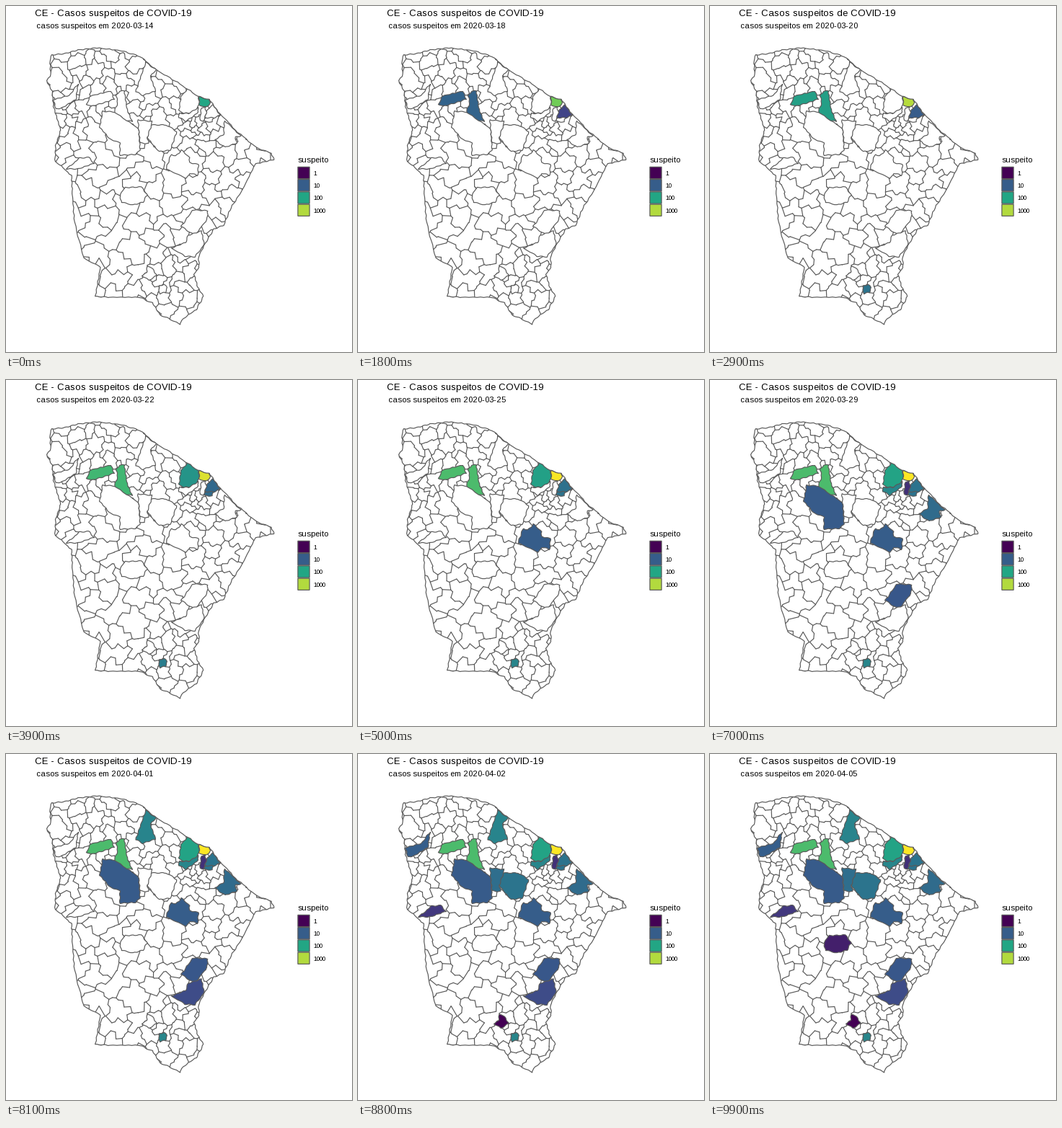
Recreate the animation shown at these times as a matplotlib script. Size 480 by 480 pixels, loop 10000 ms.

```python
import numpy as np
import matplotlib.pyplot as plt
from matplotlib.animation import FuncAnimation
from matplotlib.collections import LineCollection, PolyCollection
from matplotlib.colors import LinearSegmentedColormap
from matplotlib.patches import Polygon, Rectangle

SIZE, FRAMES, INTERVAL = 480, 100, 100
GREY, LINE = "#595959", 0.85
plt.rcParams.update({"font.family": "Liberation Sans",
                     "text.hinting_factor": 1})
scale = LinearSegmentedColormap.from_list(
    "cases", ["#440154", "#414487", "#2A788E", "#22A884", "#7AD151",
              "#FDE725"], N=1024)
rng = np.random.default_rng(14)


def outline(*xy):
    """Join key points by slightly uneven lines."""
    points = np.array(xy, float).reshape(-1, 2)
    parts = [a + (b - a) * np.linspace(0, 1, 9)[:-1, None]
             for a, b in zip(points, np.roll(points, -1, axis=0))]
    x, y = np.vstack(parts).T
    return np.column_stack([x + 0.6 * np.sin(0.7 * y + 0.2 * x),
                            y + 0.6 * np.sin(0.6 * x - 0.3 * y)])


def spacing(x, y):
    """Distance between towns: wide inland, tight around a few hubs."""
    hubs = ((262, 170, 18, 32), (95, 150, 13, 32), (225, 385, 13, 55),
            (130, 90, 10, 60), (205, 135, 9, 35), (305, 250, 6, 55))
    return 29 - sum(depth * np.exp(-((x - hx)**2 + (y - hy)**2) / reach**2)
                    for hx, hy, depth, reach in hubs)


def scatter(closeness, tries=9000):
    points = np.array([[210.0, 250.0]])
    for p in rng.uniform((45, 45), (385, 455), (tries, 2)):
        if np.hypot(*(points - p).T).min() > closeness * spacing(*p):
            points = np.vstack([points, p])
    return points


def shared_edge(a, b, near):
    """The part of the bisector of a and b that no nearer point claims."""
    middle, (dx, dy) = (a + b) / 2, b - a
    along, away = np.array([-dy, dx]), near - a
    slope = 2 * away @ along
    gap = (near**2).sum(1) - a @ a - 2 * away @ middle
    up, down = slope > 1e-9, slope < -1e-9
    high = np.min(gap[up] / slope[up], initial=9)
    low = np.max(gap[down] / slope[down], initial=-9)
    return [middle + low * along, middle + high * along] if low < high else None


def town_borders():
    """Patches of land go to the nearest town; draw lines between owners."""
    towns, patches = scatter(0.78), scatter(0.3)
    angle = rng.uniform(0, np.pi, len(towns))
    stretch = rng.uniform(0.72, 1.4, len(towns))
    dx, dy = np.moveaxis(patches[:, None] - towns, 2, 0)
    u = (dx * np.cos(angle) + dy * np.sin(angle)) * stretch
    v = (dy * np.cos(angle) - dx * np.sin(angle)) / stretch
    owner = np.argmin(np.hypot(u, v) / spacing(*towns.T), axis=1)
    lines = []
    for i, a in enumerate(patches):
        order = np.argsort(np.hypot(*(patches - a).T))[1:30]
        for j in order[:15]:
            if i < j and owner[i] != owner[j]:
                edge = shared_edge(a, patches[j], patches[order])
                if edge:
                    lines.append(edge)
    return lines


state_shape = outline(
    56, 103, 62, 97, 61, 74, 64, 68, 82, 66, 100, 61, 126, 58, 160, 62,
    186, 70, 209, 89, 238, 106, 266, 125, 282, 130, 294, 146, 318, 172,
    348, 197, 368, 204, 372, 213, 346, 219, 328, 255, 312, 280, 302, 304,
    288, 310, 275, 332, 267, 348, 268, 362, 261, 372, 266, 391, 274, 403,
    264, 421, 243, 436, 242, 442, 231, 436, 213, 428, 203, 412, 185, 404,
    144, 404, 124, 403, 131, 362, 108, 350, 95, 300, 92, 260, 91, 235,
    68, 215, 69, 193, 76, 172, 66, 140, 64, 118)

# First day, first and last colour position, days to settle, outline.
regions = [
    (3, .22, .695, 7, outline(112, 136, 117, 125, 146, 118, 150, 129, 136, 134,
                              118, 139)),
    (3, .22, .695, 7, outline(153, 125, 157, 118, 164, 118, 168, 143, 175, 160,
                              166, 159, 150, 148, 155, 134)),
    (0, .59, 1, 12, outline(268, 126, 281, 129, 284, 134, 277, 141, 268, 137)),
    (2, .13, .38, 10, outline(287, 137, 297, 151, 285, 157, 276, 155,
                              278, 146)),
    (9, .35, .38, 1, outline(276, 155, 288, 155, 286, 161, 274, 160)),
    (12, .14, .14, 1, outline(271, 141, 276, 140, 278, 148, 274, 160,
                              269, 158)),
    (8, .48, .58, 4, outline(243, 125, 252, 115, 267, 124, 268, 137, 260, 148,
                             246, 149, 240, 144)),
    (12, .46, .46, 1, outline(240, 149, 254, 149, 266, 141, 267, 147, 250, 160,
                              240, 155)),
    (10, .295, .295, 1, outline(229, 206, 236, 208, 243, 200, 255, 210,
                                254, 217, 267, 220, 266, 235, 255, 232,
                                250, 239, 222, 226)),
    (7, .38, .46, 5, outline(212, 389, 219, 386, 224, 391, 221, 397, 213, 399)),
    (16, .29, .29, 1, outline(134, 146, 150, 147, 184, 170, 186, 199, 180, 206,
                              158, 207, 158, 190, 143, 184, 130, 168)),
    (16, .35, .35, 1, outline(303, 159, 326, 180, 318, 182, 320, 190, 304, 196,
                              290, 186, 302, 178)),
    (16, .275, .275, 1, outline(259, 283, 280, 284, 279, 296, 262, 318,
                                243, 306)),
    (18, .23, .23, 1, outline(253, 318, 271, 312, 275, 331, 262, 348, 248, 347,
                              230, 336, 249, 328)),
    (18, .45, .45, 1, outline(194, 78, 209, 89, 200, 97, 208, 118, 190, 124,
                              180, 119, 187, 98)),
    (19, .3, .3, 1, outline(66, 130, 88, 124, 100, 108, 97, 130, 78, 141,
                            69, 143)),
    (19, .36, .36, 1, outline(183, 158, 202, 160, 203, 175, 196, 182, 198, 191,
                              186, 190, 184, 170)),
    (19, .385, .385, 1, outline(202, 165, 222, 165, 237, 174, 228, 200,
                                212, 202, 196, 182)),
    (20, .165, .165, 1, outline(84, 226, 102, 211, 115, 210, 122, 218,
                                100, 226)),
    (20, 0, 0, 1, outline(196, 361, 203, 364, 209, 373, 199, 381, 189, 374,
                          195, 370)),
    (21, .09, .09, 1, outline(158, 262, 165, 252, 188, 251, 196, 262, 190, 272,
                              176, 276, 160, 272)),
]

fig = plt.figure(figsize=(SIZE / 100, SIZE / 100), dpi=100, facecolor="white")
ax = fig.add_axes([0, 0, 1, 1])
ax.set(xlim=(0, SIZE), ylim=(SIZE, 0))
ax.axis("off")


def label(x, y, text, px, va="baseline"):
    return ax.text(x, y, text, fontsize=px * 0.72, va=va, color="black")


state = Polygon(state_shape, fc="none", ec=GREY, lw=LINE, zorder=3)
ax.add_patch(state)
fills = PolyCollection([region[-1] for region in regions], edgecolors=GREY,
                       linewidths=LINE, zorder=2)
for layer in (LineCollection(town_borders(), colors=GREY, linewidths=LINE,
                             capstyle="round", zorder=1), fills):
    ax.add_collection(layer, autolim=False)
    layer.set_clip_path(state)

label(40, 14, "CE - Casos suspeitos de COVID-19", 13.2)
subtitle = label(42.5, 31, "", 11)
label(404, 217, "suspeito", 11)
for i in range(4):
    top = 223.3 + 17.28 * i
    ax.add_patch(Rectangle((404.9, top), 16.2, 16.2, fc=scale(0.295 * i),
                           ec=GREY, lw=LINE, snap=False))
    label(426.4, top + 8.1, str(10 ** i), 8.8, "center_baseline")


def colour(day, start, first, last, span):
    if day < start:
        return (1, 1, 1, 1)
    left = 1 - min(1, (day - start) / span)
    return scale(float(last - (last - first) * left ** 1.5))


def draw(frame):
    date = 14 + 2 * frame // 9
    month, date = (3, date) if date <= 31 else (4, date - 31)
    subtitle.set_text(f"casos suspeitos em 2020-{month:02d}-{date:02d}")
    # Counts change half a day ahead of the date shown.
    day = (2 * frame + 4 + frame % 2) // 9
    fills.set_facecolor([colour(day, *region[:-1]) for region in regions])
    return fills, subtitle


animation = FuncAnimation(fig, draw, frames=FRAMES, interval=INTERVAL,
                          repeat=True, repeat_delay=0)
plt.show()
```
